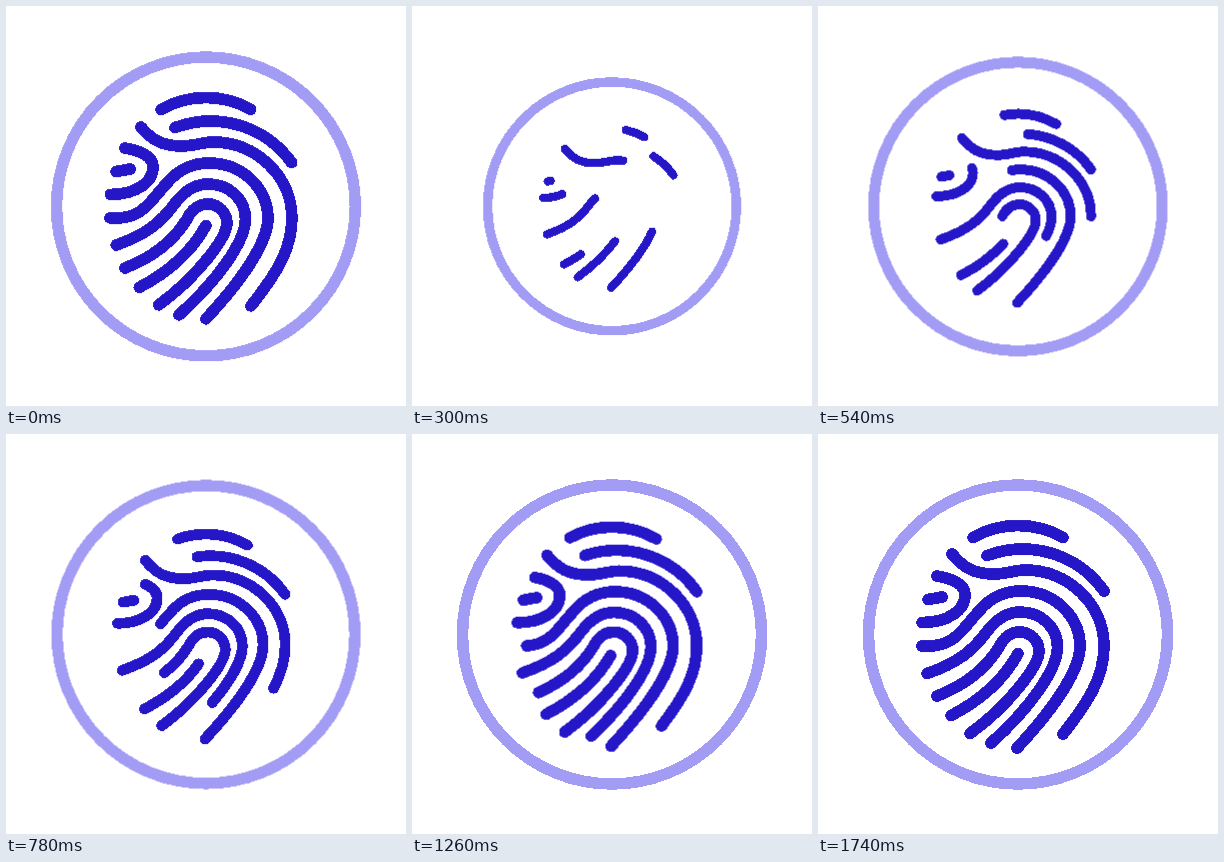
Animation of 400x400 px, one loop 1.8 s. Source, as an HTML page:

```html
<!DOCTYPE html>
<html lang="en">
<head>
<meta charset="utf-8">
<title>Fingerprint</title>
<style>
  html, body { margin: 0; width: 100%; height: 100%; overflow: hidden; background: #fff; }
  svg { display: block; width: 100%; height: 100%; shape-rendering: crispEdges; }

  .ring, .print { fill: none; transform-origin: 200px 200px; }
  .ring { stroke: #a39cf4; stroke-width: 11.5; animation: ring 1.8s infinite; }
  .print {
    stroke: #2516c7;
    stroke-width: 11.7;
    stroke-linecap: round;
    stroke-linejoin: round;
    animation: print 1.8s infinite;
  }
  .print path { stroke-dasharray: 1 1; animation: trace 1.8s infinite; }

  @keyframes ring {
    0% { transform: scale(1); animation-timing-function: cubic-bezier(.33, .33, .6, .7); }
    15% { transform: scale(.803); animation-timing-function: cubic-bezier(.25, 1, .45, 1); }
    60%, 100% { transform: scale(1); }
  }
  @keyframes print {
    0% { transform: scale(1); animation-timing-function: cubic-bezier(.4, .2, .7, .68); }
    15% { transform: scale(.688); animation-timing-function: cubic-bezier(.21, .96, .69, 1); }
    100% { transform: scale(1); }
  }
  /* each ridge withdraws to its start, then grows back from its end */
  @keyframes trace {
    0% { stroke-dashoffset: 0; animation-timing-function: cubic-bezier(.33, .33, .6, .66); }
    13.33% { stroke-dashoffset: 1; animation-timing-function: cubic-bezier(.06, 1, .69, 1); }
    100% { stroke-dashoffset: 2; }
  }
</style>
</head>
<body>
<svg viewBox="0 0 400 400">
  <circle class="ring" cx="200" cy="200.5" r="149.5"/>
  <g class="print">
    <path pathLength="1" d="M155 103.5C183 87.5 217 87.5 245 103.5"/>
    <path pathLength="1" d="M169 121.5C211 106 259 119 286 157"/>
    <path pathLength="1" d="M245 300C271 267 286 243 286 212C286 170 250 136 207 136C197 136 188 140 176 140C155 140 145 133 134 120"/>
    <path pathLength="1" d="M119 142C136 145 147 151 147 161C147 177 129 188.5 104 188.5"/>
    <path pathLength="1" d="M124 163L110 165.5"/>
    <path pathLength="1" d="M104 212C137 214 143 196 161 177C171 165 185 157 203 157C236 157 262 182 262 212C262 234 240 270 199 314"/>
    <path pathLength="1" d="M173 309C210 276 239.5 236 239.5 213C239.5 193 223 178 202 178C189 178 178 186 170 196C154 218 139 229 109 239.5"/>
    <path pathLength="1" d="M119 262C150 250 170 231 181 213C186 203 192 198 202 198C212 198 221 206 221 217C221 232 190 272 152 299.5"/>
    <path pathLength="1" d="M200 219.5C186 245 165 265 133 281.5"/>
  </g>
</svg>
</body>
</html>
```
